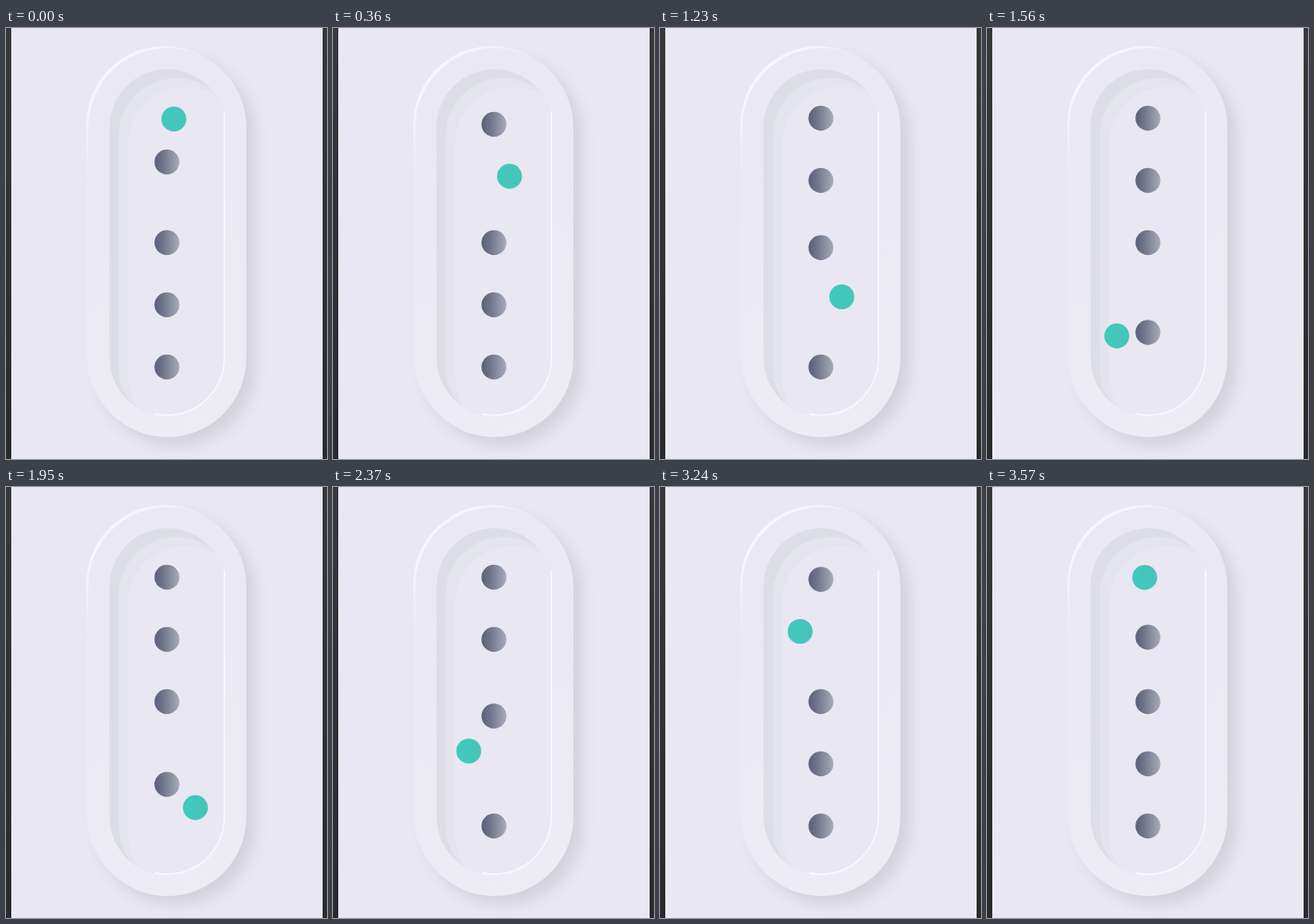
Recreate the animation shown at these times as an HTML page. Size 366 by 492 pixels, loop 3.6 s.

```html
<!DOCTYPE html>
<html lang="en">
<head>
<meta charset="utf-8">
<title>Neumorphic loader</title>
<style>
  html, body { margin: 0; width: 100%; height: 100%; overflow: hidden; background: #e8e7f2; }
  svg { display: block; width: 366px; height: 492px; }
</style>
</head>
<body>
<svg viewBox="0 0 366 492">
  <defs>
    <linearGradient id="edge" x2="0" y2="1">
      <stop stop-color="#38383a"/><stop offset="1" stop-color="#2a2a2c"/>
    </linearGradient>
    <linearGradient id="ring" gradientUnits="userSpaceOnUse" x1="100" y1="40" x2="270" y2="440">
      <stop stop-color="#e9e8f3"/><stop offset="1" stop-color="#edecf4"/>
    </linearGradient>
    <linearGradient id="shine" gradientUnits="userSpaceOnUse" x1="120" y1="50" x2="165" y2="95">
      <stop stop-color="#f7f7fb"/><stop offset="1" stop-color="#f7f7fb" stop-opacity=".3"/>
    </linearGradient>
    <linearGradient id="gray">
      <stop offset=".05" stop-color="#5d627c"/><stop offset=".35" stop-color="#70758b"/><stop offset="1" stop-color="#a8abb9"/>
    </linearGradient>
    <linearGradient id="teal">
      <stop stop-color="#41c9bd"/><stop offset="1" stop-color="#47c4b9"/>
    </linearGradient>
    <filter id="soft" x="-30%" y="-30%" width="160%" height="160%"><feGaussianBlur stdDeviation="8"/></filter>
    <rect id="outer" x="94" y="23" width="180" height="444" rx="90"/>
    <rect id="inner" x="118" y="47" width="132" height="396" rx="66"/>
    <clipPath id="well"><use href="#inner"/></clipPath>
  </defs>

  <rect width="366" height="492" fill="#e8e7f2"/>
  <use href="#outer" x="10" y="10" fill="#46463c" opacity=".13" filter="url(#soft)"/>
  <use href="#outer" x="-2.5" y="-2.5" fill="url(#shine)"/>
  <use href="#outer" fill="url(#ring)"/>
  <g clip-path="url(#well)">
    <use href="#inner" fill="#dddde6"/>
    <use href="#inner" x="10.5" y="10" fill="#e4e4ed"/>
    <use href="#inner" x="21" y="20" fill="#e8e7f2"/>
    <path d="M184 46A66 66 0 0 1 250 113V377A66 66 0 0 1 184 443" fill="none" stroke="#e8e7f2" stroke-width="0"/>
  </g>
  <path d="M249 95V377A65 65 0 0 1 170 440.500" fill="none" stroke="#f8f8fc" stroke-width="1.800"/>
  <g id="dots"></g>
  <rect width="6" height="492" fill="url(#edge)"/>
  <rect x="361" width="5" height="492" fill="url(#edge)"/>
</svg>
<script>
const LOOP = 3600, STEP = 450, FRAME = 30;
const CX = 183.5, TOP = 103, GAP = 71, R = 14.2;

const layer = document.getElementById('dots');
function addDot(fill) {
  const c = document.createElementNS('http://www.w3.org/2000/svg', 'circle');
  c.setAttribute('r', R);
  c.setAttribute('cx', CX);
  c.setAttribute('fill', `url(#${fill})`);
  return layer.appendChild(c);
}
const grays = [0, 1, 2, 3].map(() => addDot('gray'));
const ball = addDot('teal');

// cubic-bezier(.42, 0, .58, 1)
function ease(x) {
  if (x <= 0) return 0;
  if (x >= 1) return 1;
  let lo = 0, hi = 1, s;
  for (let i = 0; i < 20; i++) {
    s = (lo + hi) / 2;
    const bx = 1.26 * s * (1 - s) ** 2 + 1.74 * s * s * (1 - s) + s ** 3;
    if (bx < x) lo = s; else hi = s;
  }
  return s * s * (3 - 2 * s);
}

// The ball weaves down the column and back in half circles.
function ballAt(t) {
  const phase = ((t + 15) / STEP) % 8;
  const k = Math.floor(phase), a = Math.PI * (phase - k);
  const dir = k < 4 ? 1 : -1, side = k % 2 ? -1 : 1;
  const from = k < 4 ? k : 8 - k;
  return [
    CX + side * GAP / 2 * Math.sin(a),
    TOP + GAP * (from + dir / 2 * (1 - Math.cos(a)))
  ];
}

// Each gray dot swaps places with the passing ball.
function grayAt(i, t) {
  const move = (k, lag) => ease((t - k * STEP - lag) / STEP);
  if (i === 0) {
    return t < 416 ? TOP + (416 - t) * 0.1254 : TOP + GAP * move(7, 30);
  }
  return TOP + GAP * (i + 1 - move(i, -30) + move(7 - i, -30));
}

function draw(t) {
  const [x, y] = ballAt(t);
  ball.setAttribute('cx', x);
  ball.setAttribute('cy', y);
  grays.forEach((g, i) => g.setAttribute('cy', grayAt(i, t)));
}

const start = performance.now();
function tick() {
  const t = (performance.now() - start) % LOOP;
  draw(Math.max(17, Math.floor(t / FRAME) * FRAME));
  requestAnimationFrame(tick);
}
tick();
</script>
</body>
</html>
```
